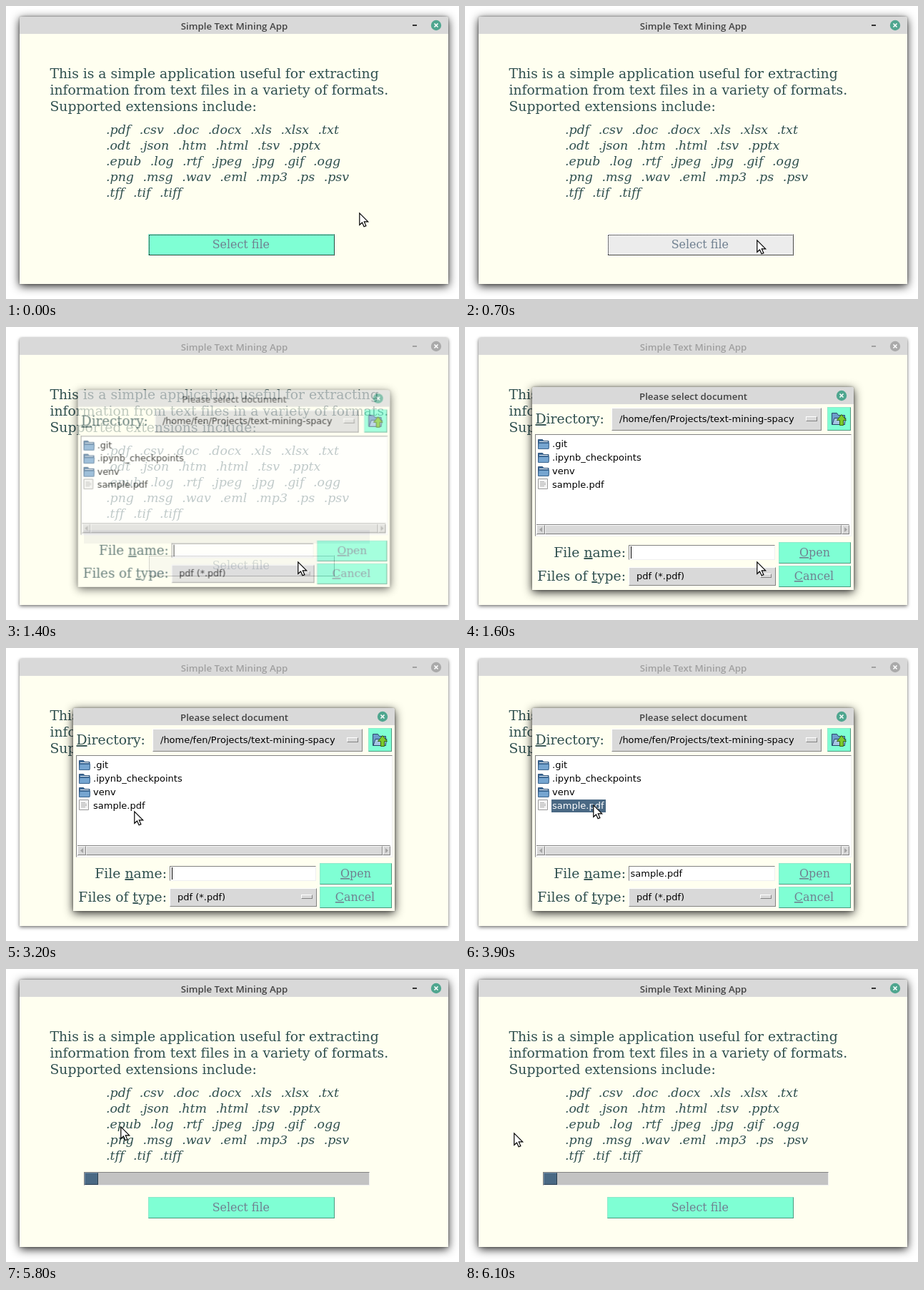
Animation of 634 by 410 pixels, one loop 8000 ms. Source, as an HTML page:

```html
<!DOCTYPE html>
<html lang="en">
<head>
<meta charset="utf-8">
<title>Simple Text Mining App</title>
<style>
html, body { margin: 0; width: 100%; height: 100%; overflow: hidden; background: #fff; }
div, svg { position: absolute; box-sizing: border-box; }
svg { left: 0; top: 0; overflow: visible; }
text { white-space: pre; font-kerning: none; font-variant-ligatures: none; }

:root {
  --active: 0 3px 13px rgba(0,0,0,.85), 0 0 3px rgba(0,0,0,.4);
  --idle: 0 2px 5px rgba(0,0,0,.5), 0 0 2px rgba(0,0,0,.25);
}
#stage { left: 0; top: 0; width: 634px; height: 410px; overflow: hidden; }
.win { background: #fffff0; border-radius: 3px 3px 0 0; box-shadow: var(--active); }
.bar { left: 0; top: 0; width: 100%; height: 24px; background: #d9d9d9; border-radius: 3px 3px 0 0; }
#dialog { left: 0; top: 0; width: 634px; height: 410px; transform-origin: 318.5px 226px; }

/* widgets */
.up, .down { border: 1px solid; background: #d9d9d9; }
.up { border-color: #fff #828282 #828282 #fff; }
.down { border-color: #828282 #f0f0f0 #f0f0f0 #828282; background: #fff; }
.aqua { background: #7fffd4; border-color: #8fe8cb #4c997f #4c997f #8fe8cb; }
#focus { stroke: #000; stroke-dasharray: 1 1; stroke-dashoffset: 1; }

/* type */
.title { font: 600 13.3px "Open Sans", "Noto Sans", sans-serif; fill: #434343; text-anchor: middle; }
.lead { font: 18.8px "DejaVu Serif", serif; fill: #2f4f4f; }
.list { font: italic 17.4px "DejaVu Serif", serif; word-spacing: .75px; fill: #2f4f4f; }
.btn { font: 15.9px "DejaVu Serif", serif; fill: #708090; text-anchor: middle; }
.sans { font: 13px "DejaVu Sans", sans-serif; fill: #000; }
.end { text-anchor: end; }
.u { text-decoration: underline; text-decoration-skip-ink: none; }

/* motion: every state change is a hard step */
.a { animation: 8s step-end infinite; }
#main { animation-name: shadow; }
#mainTitle { animation-name: title; }
#min { animation-name: min; }
#close { animation-name: close; }
#select { animation-name: select; }
#focus { animation-name: focus; }
#flat { animation-name: flat; }
#progress { animation-name: progress; }
#dialog { animation-name: dialog; }
#caret { animation-name: caret; }
#picked { animation-name: picked; }
#name { animation-name: name; }
#pointer { animation-name: pointer; }

@keyframes shadow { 0%, 55% { box-shadow: var(--active); } 17.5% { box-shadow: var(--idle); } }
@keyframes title { 0%, 55% { fill: #434343; } 17.5% { fill: #a0a0a0; } }
@keyframes min { 0%, 55% { fill: #333; } 17.5% { fill: #a0a0a0; } }
@keyframes close { 0%, 55% { fill: #4fa68f; } 17.5% { fill: #aaa; } }
@keyframes select {
  0%, 55% { background: #7fffd4; border-color: #8fe8cb #4c997f #4c997f #8fe8cb; }
  8.75%, 16.25% { background: #ececec; border-color: #fff #9a9a9a #9a9a9a #fff; }
  15% { background: #ececec; border-color: #9a9a9a #fff #fff #9a9a9a; }
}
@keyframes focus { 0% { opacity: 1; } 55%, 100% { opacity: 0; } }
@keyframes flat { 0%, 55% { opacity: 0; } 16.25% { opacity: 1; } }
@keyframes progress { 0% { opacity: 0; } 55%, 100% { opacity: 1; } }
@keyframes dialog {
  0%, 56.25% { opacity: 0; transform: none; }
  17.5% { opacity: .7; transform: scale(.97); }
  20% { opacity: 1; transform: none; }
  55% { opacity: .03; transform: scale(.89); }
}
@keyframes caret {
  0%, 28.75%, 40% { opacity: 1; }
  25%, 36.25%, 47.5%, 100% { opacity: 0; }
}
@keyframes picked { 0% { opacity: 0; } 47.5%, 100% { opacity: 1; } }
@keyframes name { 0% { opacity: 0; } 48.75%, 100% { opacity: 1; } }
@keyframes pointer {
  0% { transform: translate(494px, 289px); }
  6.25% { transform: translate(480px, 298px); }
  7.5% { transform: translate(440px, 316px); }
  8.75% { transform: translate(408px, 327px); }
  11.25% { transform: translate(408px, 328px); }
  32.5% { transform: translate(392px, 322px); }
  33.75% { transform: translate(330px, 291px); }
  35% { transform: translate(235px, 255px); }
  36.25% { transform: translate(184px, 245px); }
  38.75% { transform: translate(182px, 237px); }
  40% { transform: translate(179px, 228px); }
  41.25% { transform: translate(179px, 226px); }
  42.5% { transform: translate(179px, 224px); }
  43.75% { transform: translate(179px, 221px); }
  45% { transform: translate(179px, 219px); }
  72.5% { transform: translate(160px, 220px); }
  73.75% { transform: translate(120px, 224px); }
  75% { transform: translate(82px, 228px); }
  76.25%, 100% { transform: translate(68px, 229px); }
}
</style>
</head>
<body>
<div id="stage">

  <div id="main" class="win a" style="left:19px;top:15px;width:600px;height:374px"><div class="bar"></div></div>
  <div id="flat" class="a" style="left:109px;top:284px;width:400px;height:19px;background:#d9d9d9"></div>
  <div id="progress" class="down a" style="left:109px;top:284px;width:400px;height:19px;background:#c3c3c3">
    <div class="up" style="left:0;top:0;width:19px;height:17px;background:#4a6984;border-color:#6d8ba6 #2c3f4f #2c3f4f #6d8ba6"></div>
  </div>
  <div id="select" class="up aqua a" style="left:199px;top:319px;width:261px;height:30px"></div>

  <svg width="634" height="410">
    <path id="focus" class="a" d="M200 320.500H460M200 348.500H460M200.500 320V349M459.500 321V349"/>
    <text id="mainTitle" class="title a" x="319.5" y="33">Simple Text Mining App</text>
    <rect id="min" class="a" x="569" y="26" width="6" height="2"/>
    <circle id="close" class="a" cx="602" cy="27" r="7.2"/>
    <path d="M599.5 24.500l5 5m0-5l-5 5" stroke="#fff" stroke-width="1.6"/>
    <g class="lead">
      <text x="61.5" y="101">This is a simple application useful for extracting</text>
      <text x="61.5" y="124">information from text files in a variety of formats.</text>
      <text x="61.5" y="147">Supported extensions include:</text>
    </g>
    <g class="list">
      <text x="140" y="179">.pdf  .csv  .doc  .docx  .xls  .xlsx  .txt</text>
      <text x="140" y="201">.odt  .json  .htm  .html  .tsv  .pptx</text>
      <text x="140" y="223">.epub  .log  .rtf  .jpeg  .jpg  .gif  .ogg</text>
      <text x="140" y="245">.png  .msg  .wav  .eml  .mp3  .ps  .psv</text>
      <text x="140" y="267">.tff  .tif  .tiff</text>
    </g>
    <text class="btn" x="328.8" y="339">Select file</text>
  </svg>

  <div id="dialog" class="a">
    <div class="win" style="left:94px;top:84px;width:450px;height:284px"><div class="bar"></div></div>
    <div class="up" style="left:205px;top:113px;width:294px;height:32px"></div>
    <div class="up" style="left:477px;top:125px;width:16px;height:7px"></div>
    <div class="up aqua" style="left:507px;top:112px;width:33px;height:33px"></div>
    <div class="down" style="left:98px;top:150px;width:443px;height:143px"></div>
    <div class="down" style="left:100px;top:276px;width:438px;height:15px;background:#c3c3c3"></div>
    <div class="up" style="left:100px;top:277px;width:12px;height:13px"></div>
    <div class="up" style="left:112px;top:277px;width:415px;height:13px"></div>
    <div class="up" style="left:527px;top:277px;width:11px;height:13px"></div>
    <div class="down" style="left:229px;top:305px;width:205px;height:21px"></div>
    <div class="up" style="left:229px;top:336px;width:206px;height:26px"></div>
    <div class="up" style="left:413px;top:345px;width:16px;height:6px"></div>
    <div class="up aqua" style="left:439px;top:301px;width:101px;height:30px"></div>
    <div class="up aqua" style="left:439px;top:334px;width:101px;height:30px"></div>

    <svg width="634" height="410">
      <defs>
        <g id="folder">
          <path d="M.5 13.500v-12h6l1.500 2h7v10z" fill="#3f6c99" stroke="#2d5279"/>
          <path d="M2 4.500h12" stroke="#e8eef4"/>
          <path d="M.5 14.500l.5-8h14.500l-.5 8z" fill="#76a5d0" stroke="#3a658f"/>
        </g>
      </defs>
      <text class="title" x="319.5" y="102">Please select document</text>
      <circle cx="527" cy="96" r="7.2" fill="#4fa68f"/>
      <path d="M524.5 93.500l5 5m0-5l-5 5" stroke="#fff" stroke-width="1.6"/>

      <g class="lead">
        <text x="98.5" y="135"><tspan class="u">D</tspan>irectory:</text>
        <text class="end" x="225" y="322">File <tspan class="u">n</tspan>ame:</text>
        <text class="end" x="225" y="355">Files of <tspan class="u">t</tspan>ype:</text>
      </g>
      <g class="btn">
        <text x="489.5" y="321"><tspan class="u">O</tspan>pen</text>
        <text x="488.5" y="354"><tspan class="u">C</tspan>ancel</text>
      </g>

      <use href="#folder" x="102" y="156"/>
      <use href="#folder" x="102" y="175"/>
      <use href="#folder" x="102" y="194"/>
      <path d="M102.500 212.500h13v14h-13z" fill="#f4f4f4" stroke="#9c9c9c"/>
      <path d="M105 216.500h6m-6 2h8m-8 2h8m-8 2h6" stroke="#b0b0b0"/>

      <path d="M513.500 136.500v-16h7l2 3h9v13z" fill="#6c9cc9" stroke="#28486a"/>
      <path d="M514 136.500l3-9h16l-2 9z" fill="#a5c6e4" stroke="#28486a"/>
      <path d="M524.500 137.500v-7h-4l6.500-8 6.500 8h-4v7z" fill="#7ccb2c" stroke="#356a10"/>

      <path d="M108 280v7l-4-3.500zM531 280v7l4-3.500z" fill="#a3a3a3"/>

      <g class="sans">
        <text x="216" y="133">/home/fen/Projects/text-mining-spacy</text>
        <text x="122" y="168">.git</text>
        <text x="122" y="187">.ipynb_checkpoints</text>
        <text x="122" y="206">venv</text>
        <text x="122" y="225">sample.pdf</text>
        <text x="240" y="353">pdf (*.pdf)</text>
        <text id="name" class="a" x="231.500" y="320">sample.pdf</text>
        <g id="picked" class="a">
          <rect x="121" y="212" width="76" height="18" fill="#4a6984"/>
          <text x="122" y="225" fill="#fff">sample.pdf</text>
        </g>
      </g>
      <rect id="caret" class="a" x="232" y="307" width="1" height="17"/>
    </svg>
  </div>

  <svg id="pointer" class="a" width="14" height="21">
    <path d="M.8.9v16.400l3.700-3.300 2.600 5.800 2.800-1.200-2.600-5.700h5.400z" fill="#fff" stroke="#000" stroke-width="1.2"/>
  </svg>
</div>
</body>
</html>
```
